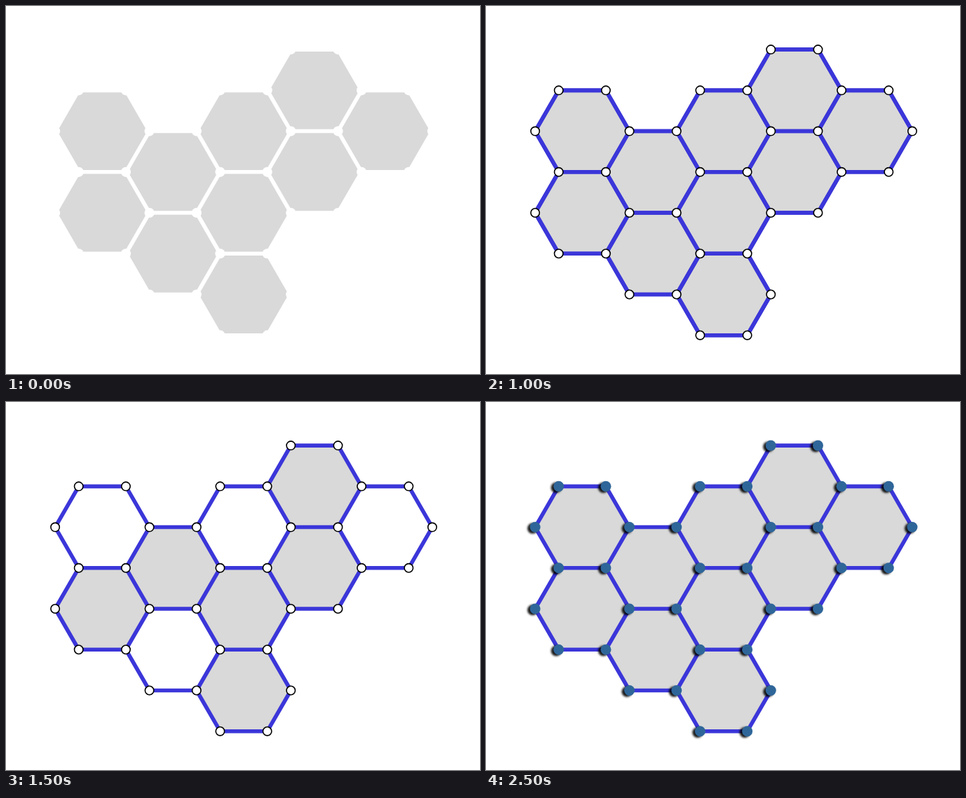
Write an HTML page with a canvas that moves like this. It is 676x525 px and loops after 3 s.

```html
<!DOCTYPE html>
<html lang="en">
<head>
<meta charset="utf-8">
<title>Hexagon tiles</title>
<style>
  html, body { margin: 0; width: 100%; height: 100%; overflow: hidden; background: #fff; }
  canvas { display: block; width: 676px; height: 525px; }
</style>
</head>
<body>
<canvas id="stage" width="676" height="525"></canvas>
<script>
const ctx = document.getElementById('stage').getContext('2d');
const BLUE = '#3b36d9', GRAY = '#d9d9d9', WHITE = '#fff';
const LINE = 5.6, STEP_MS = 500, STEPS = 6;

// Everything sits on a half-side by half-height lattice.
const toX = gx => 70.1 + gx * 33.615;
const toY = gy => 62.1 + gy * 58.23;
const CORNERS = [[2, 0], [1, 1], [-1, 1], [-2, 0], [-1, -1], [1, -1]];

const columns = [[2, 4], [3, 5], [2, 4, 6], [1, 3], [2]];
const hollow = new Set(['0,2', '1,5', '2,2', '4,2']);

const cells = columns.flatMap((rows, col) => rows.map(row => ({
  hollow: hollow.has(`${col},${row}`),
  corners: CORNERS.map(([dx, dy]) => [2 + 3 * col + dx, row + dy])
})));

// Shared corners and sides are kept once.
const nodes = new Map(), edges = new Map();
for (const { corners } of cells) {
  corners.forEach((a, i) => {
    const b = corners[(i + 1) % 6];
    nodes.set(String(a), a);
    edges.set([a, b].map(String).sort().join('|'), [a, b]);
  });
}

function drawCells(skipHollow) {
  ctx.fillStyle = GRAY;
  ctx.beginPath();
  for (const cell of cells) {
    if (skipHollow && cell.hollow) continue;
    cell.corners.forEach(([x, y], i) => ctx[i ? 'lineTo' : 'moveTo'](toX(x), toY(y)));
    ctx.closePath();
  }
  ctx.fill();
}

function drawEdges(color) {
  ctx.strokeStyle = color;
  ctx.lineWidth = LINE;
  ctx.beginPath();
  for (const [a, b] of edges.values()) {
    ctx.moveTo(toX(a[0]), toY(a[1]));
    ctx.lineTo(toX(b[0]), toY(b[1]));
  }
  ctx.stroke();
}

function drawNodes(radius, fill, outline) {
  ctx.fillStyle = fill;
  ctx.strokeStyle = outline;
  ctx.lineWidth = 1.6;
  for (const [x, y] of nodes.values()) {
    ctx.beginPath();
    ctx.arc(toX(x), toY(y), radius, 0, Math.PI * 2);
    ctx.fill();
    if (outline) ctx.stroke();
  }
}

function drawShadedNodes() {
  ctx.save();
  ctx.shadowColor = 'rgba(0, 0, 0, 0.9)';
  ctx.shadowBlur = 3;
  ctx.shadowOffsetX = -3.6;
  ctx.shadowOffsetY = 1.8;
  drawNodes(7.5, '#2f6699');
  ctx.restore();
}

function render(step) {
  ctx.fillStyle = WHITE;
  ctx.fillRect(0, 0, 676, 525);
  drawCells(step === 3);
  if (step > 0) drawEdges(BLUE);
  if (step < 2) drawEdges(WHITE);
  if (step === 2) drawEdges(BLUE);
  if (step === 0) drawNodes(7.1, WHITE);
  else if (step === 5) drawShadedNodes();
  else drawNodes(6.2, WHITE, '#000');
}

let start = null, shown = -1;
function tick(now) {
  if (start === null) start = now;
  const step = Math.floor(Math.max(0, now - start) / STEP_MS) % STEPS;
  if (step !== shown) render(shown = step);
  requestAnimationFrame(tick);
}
render(shown = 0);
requestAnimationFrame(tick);
</script>
</body>
</html>
```
